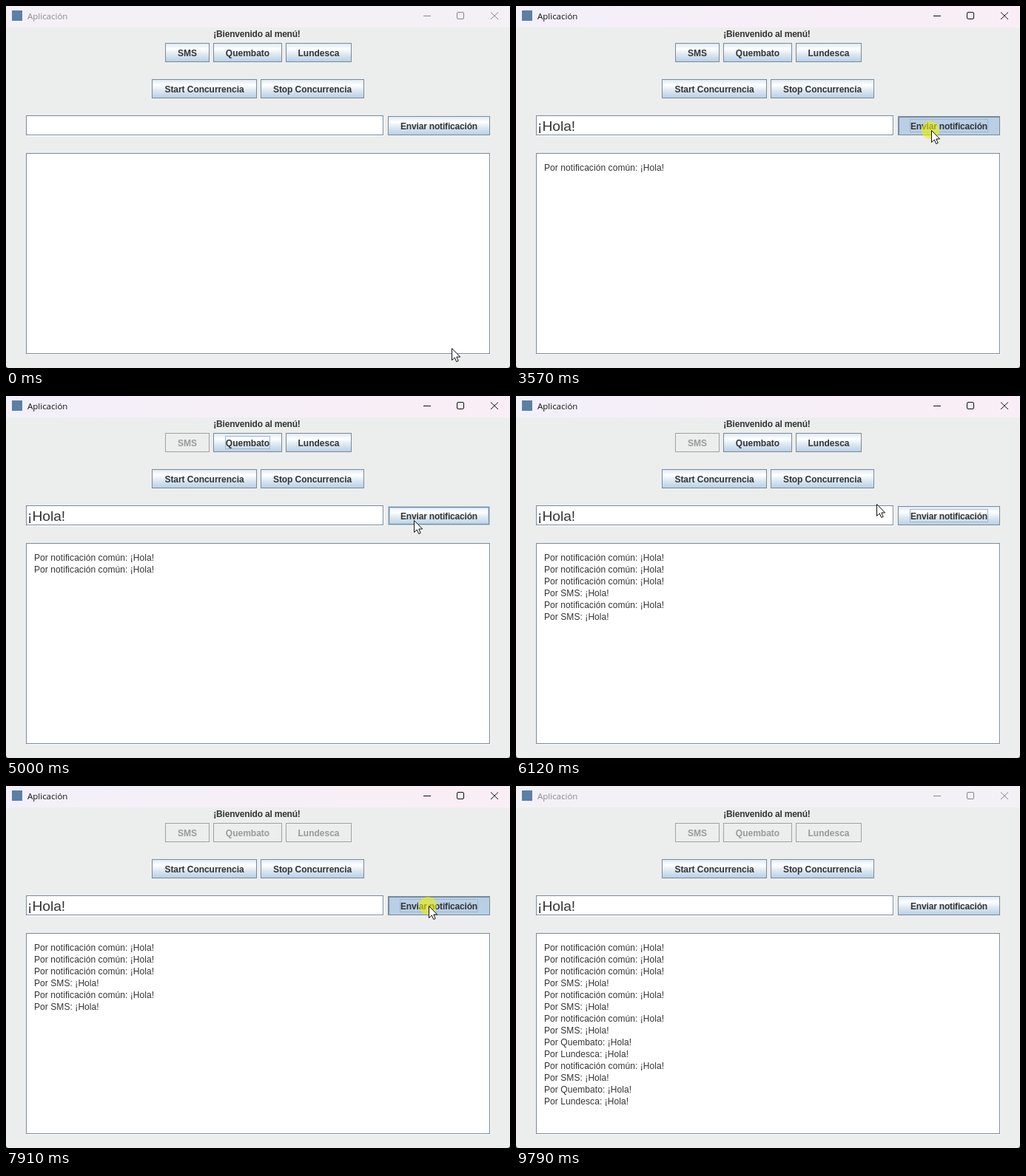
Animation, 681 px wide and 490 px high, one loop 9.86 s. Source, as an HTML page:

```html
<!DOCTYPE html>
<html lang="es">
<head>
<meta charset="utf-8">
<title>Aplicación</title>
<style>
  html, body { margin: 0; width: 100%; height: 100%; overflow: hidden; background: #3a3c40; }
  svg { display: block; }
  text { font: 12px "Liberation Sans", Arial, sans-serif; fill: #333; white-space: pre; }
  .label { font-weight: bold; text-anchor: middle; }
  #title { font: 11.5px "Open Sans", "Noto Sans", sans-serif; fill: #111; }
  #icons { fill: none; stroke: #111; }
  .idle #title { fill: #8c898e; }
  .idle #icons { stroke: #87848a; }
  .idle #bar { fill: #f4f1f6; }
  #log text { letter-spacing: .07px; }
  #typed { font-size: 19.2px; }
  .box { fill: #fff; stroke: #7a8a99; }
  .ring { fill: none; stroke: #b8cfe5; }
</style>
</head>
<body>
<svg id="win" width="681" height="490" viewBox="0 0 681 490">
  <defs>
    <linearGradient id="face" x2="0" y2="1">
      <stop stop-color="#dde8f3"/><stop offset=".3" stop-color="#fff"/>
      <stop offset=".6" stop-color="#dde8f3"/><stop offset="1" stop-color="#b8cfe5"/>
    </linearGradient>
    <linearGradient id="tint">
      <stop stop-color="#f3f0f9"/><stop offset="1" stop-color="#faeef6"/>
    </linearGradient>
  </defs>
  <path d="M0 0H681V486Q681 490 677 490H4Q0 490 0 486Z" fill="#eceeee"/>
  <rect id="bar" width="681" height="29" fill="url(#tint)"/>
  <rect x="8" y="6" width="14" height="14" fill="#5b7fa6"/>
  <text id="title" x="29" y="18">Aplicación</text>
  <g id="icons">
    <path d="M564 13.5H574"/>
    <rect x="609.5" y="8.5" width="9" height="9" rx="1.5"/>
    <path d="M655 8.5L665 18M665 8.5L655 18"/>
  </g>
  <text class="label" x="339" y="42" letter-spacing="-.2">¡Bienvenido al menú!</text>
  <path d="M28 175.5H510.5V149M28 471.5H654.5V200" fill="none" stroke="#fff"/>
  <rect class="box" x="27.5" y="148.5" width="482" height="26"/>
  <rect class="box" x="27.5" y="199.5" width="626" height="271"/>
  <text id="typed" x="29" y="169"></text>
  <rect id="caret" y="150" width="1" height="24" fill="#222"/>
  <g id="log"></g>
  <g id="buttons"></g>
  <g id="mouse">
    <circle id="glow" cx="-1" r="12" fill="#f0f000" fill-opacity=".6"/>
    <path id="arrow" d="M.5 .5V16.5L4.3 13L6.7 18.5L9.2 17.4L6.8 12H11.7Z" fill="#fff" stroke="#111"/>
    <path id="beam" d="M-3 -7.5H0M1 -7.5H4M.5 -7V7M-3 7.5H0M1 7.5H4" fill="none" stroke="#111"/>
  </g>
</svg>
<script>
const LOOP = 9860, STEP = 67;
const $ = id => document.getElementById(id);

function add(parent, tag, attrs) {
  const el = document.createElementNS('http://www.w3.org/2000/svg', tag);
  for (const k in attrs) el.setAttribute(k, attrs[k]);
  return parent.appendChild(el);
}
const show = (el, on) => el.setAttribute('visibility', on ? 'visible' : 'hidden');

function makeButton(name, x, y, w, spacing = 0) {
  const g = $('buttons'), h = 26;
  const frame = d => ({ x: x + d + .5, y: y + d + .5, width: w - 1 - 2 * d, height: h - 1 - 2 * d });
  const b = { name, x, y, w, h };
  b.face = add(g, 'rect', frame(0));
  b.sunk = add(g, 'path', { d: `M${x} ${y + 1}H${x + w}M${x + 1} ${y}V${y + h}`, stroke: '#7a8a99', 'stroke-width': 2 });
  b.rings = [0, 2].map(d => add(g, 'rect', { ...frame(d), class: 'ring' }));
  b.edge = add(g, 'rect', { ...frame(1), fill: 'none', stroke: '#7a8a99' });
  b.focus = add(g, 'rect', { x: x + 16.5, y: y + 4.5, width: w - 33, height: 17, fill: 'none', stroke: '#a3b8cc' });
  b.text = add(g, 'text', { x: x + w / 2, y: y + 18, class: 'label', 'letter-spacing': spacing });
  b.text.textContent = name;
  return b;
}

const sms = makeButton('SMS', 215, 50, 60);
const quembato = makeButton('Quembato', 280, 50, 93);
const lundesca = makeButton('Lundesca', 378, 50, 89);
const start = makeButton('Start Concurrencia', 197, 99, 142, -.05);
const stop = makeButton('Stop Concurrencia', 344, 99, 140, -.08);
const send = makeButton('Enviar notificación', 516, 149, 138, -.18);
const buttons = [sms, quembato, lundesca, start, stop, send];
const channels = [sms, quembato, lundesca];
const field = { x: 27, y: 148, w: 483, h: 27 };
const area = { x: 27, y: 199, w: 627, h: 272 };

// [target, down, up]
const clicks = [
  [field, 473, 540], [send, 3100, 3170], [send, 3570, 3700], [sms, 4450, 4520],
  [send, 5130, 5200], [send, 5660, 5730], [quembato, 6540, 6610],
  [lundesca, 7010, 7080], [send, 7910, 7980], [send, 8380, 8510]
];

// [time, x, y]
const path = [
  [0, 602, 463], [405, 278, 162], [2613, 278, 162], [3030, 561, 168],
  [3713, 561, 168], [4315, 243, 62], [4523, 243, 62], [5000, 551, 168],
  [5070, 561, 168], [5983, 561, 168], [6120, 487, 146], [6400, 322, 63],
  [6610, 322, 63], [6890, 424, 64], [7080, 424, 64], [7840, 571, 162],
  [8843, 571, 162], [8910, 573, 202], [9260, 602, 463]
];
const word = '¡Hola!', keys = [1200, 1600, 1880, 1930, 2080, 2280];

const logLines = Array.from({ length: 14 }, (_, i) => add($('log'), 'text', { x: 38, y: 223 + 16 * i }));

function pointer(t) {
  const i = path.findIndex(p => p[0] > t);
  if (i < 0) return path[path.length - 1].slice(1);
  const [t0, x0, y0] = path[i - 1], [t1, x1, y1] = path[i];
  const u = Math.floor((t - t0) / STEP) * STEP / (t1 - t0);
  const e = u * u * (3 - 2 * u);
  return [Math.round(x0 + (x1 - x0) * e), Math.round(y0 + (y1 - y0) * e)];
}

// Replay the clicks made up to time t
function replay(t) {
  const s = { lines: [], off: new Set(), focus: null, held: null };
  for (const [target, down, up] of clicks) {
    if (t < down) break;
    s.focus = target;
    s.held = t < up ? target : null;
    if (t < up) break;
    if (target === send) {
      s.lines.push('notificación común', ...channels.filter(c => s.off.has(c)).map(c => c.name));
    } else if (target !== field) {
      s.off.add(target);
      s.focus = buttons[buttons.indexOf(target) + 1];
    }
  }
  return s;
}

function paintButton(b, s, hover, active) {
  const off = s.off.has(b), held = s.held === b, lit = hover && !off && !held;
  b.face.setAttribute('fill', off ? '#eceeee' : held ? '#b8cfe5' : 'url(#face)');
  b.face.setAttribute('stroke', off ? '#a0a1a2' : '#7a8a99');
  b.text.style.fill = off ? '#999' : '#333';
  show(b.sunk, held);
  b.rings.forEach(r => show(r, lit));
  show(b.edge, lit);
  show(b.focus, active && s.focus === b);
}

function draw(t) {
  const s = replay(t), [x, y] = pointer(t);
  const active = t >= 473 && t < 9790, inside = t < 9330;
  const over = r => inside && x >= r.x && x < r.x + r.w && y >= r.y && y < r.y + r.h;

  $('win').setAttribute('class', active ? '' : 'idle');
  buttons.forEach(b => paintButton(b, s, over(b), active));
  logLines.forEach((el, i) => el.textContent = i < s.lines.length ? `Por ${s.lines[i]}: ${word}` : '');

  const typed = $('typed');
  typed.textContent = word.slice(0, keys.filter(k => t >= k).length);
  const width = typed.textContent ? typed.getComputedTextLength() : 0;
  $('caret').setAttribute('x', Math.floor(29 + width));
  show($('caret'), t >= 473 && t < 1010 || t >= 1200 && t < 2780);

  const beam = over(field) || over(area) && t >= STEP && !(t > 8843 && t < 8970);
  $('mouse').setAttribute('transform', `translate(${x} ${y})`);
  show($('glow'), s.held);
  show($('beam'), inside && beam);
  show($('arrow'), inside && !beam);
}

function tick() {
  draw(performance.now() % LOOP);
  requestAnimationFrame(tick);
}
tick();
</script>
</body>
</html>
```
